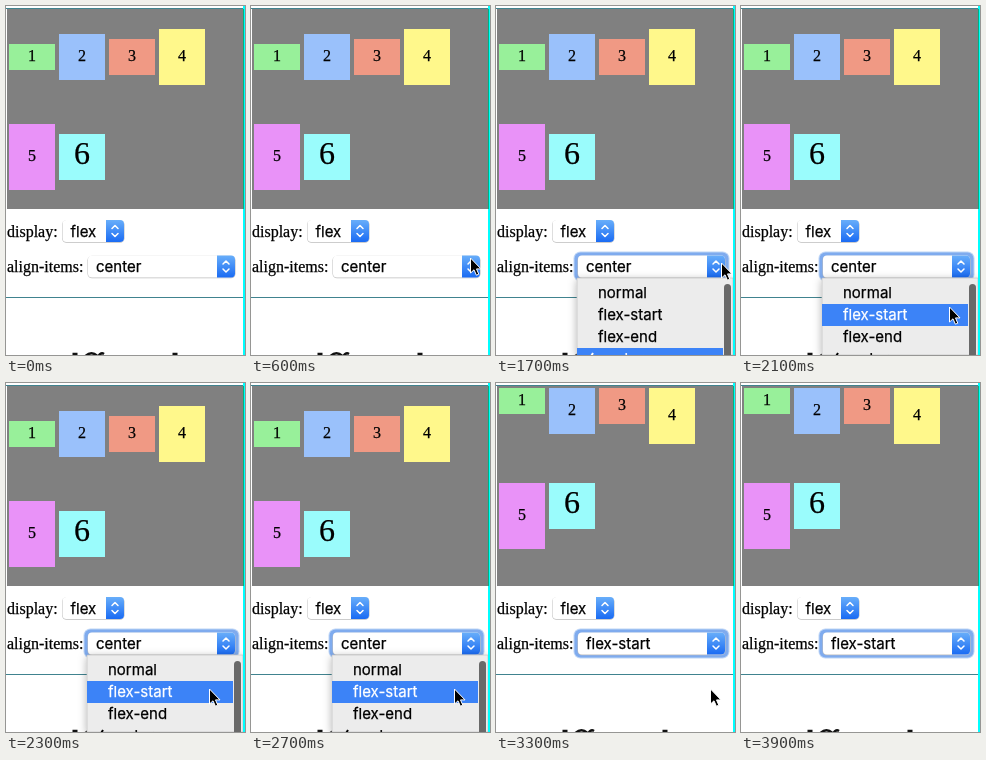
Recreate the animation shown at these times as an HTML page. Size 239 by 349 pixels, loop 4200 ms.

```html
<!DOCTYPE html>
<html lang="en">
<head>
<meta charset="utf-8">
<title>align-items</title>
<style>
  html, body { margin: 0; width: 100%; height: 100%; overflow: hidden; background: #fff; }
  svg { display: block; width: 239px; height: 349px; }
  text { font: 16px "Liberation Serif", serif; fill: #000; stroke: currentColor; stroke-width: .25px; }
  .ui text { font: 15px Inter, sans-serif; }
  .ui .active { fill: #fff; stroke: #fff; }
</style>
</head>
<body>
<svg id="stage" viewBox="0 0 239 349" xmlns="http://www.w3.org/2000/svg">
  <defs>
    <linearGradient id="blue" x2="0" y2="1">
      <stop stop-color="#68aefa"/><stop offset="1" stop-color="#1a6bf3"/>
    </linearGradient>
    <filter id="shadow" x="-20%" y="-20%" width="140%" height="140%">
      <feDropShadow dx="0" dy="2" stdDeviation="4" flood-opacity=".3"/>
    </filter>
  </defs>
  <rect width="239" height="349" fill="#fff"/>
  <path d="M0 2.5H239M0 291.5H239" stroke="#40838f"/>
  <rect x="1" y="3" width="236" height="200" fill="#808080"/>
  <g id="items"></g>
  <text x="1" y="231">display:</text>
  <text x="1" y="266">align-items:</text>
  <g fill="none" stroke="#111" stroke-width="2.5">
    <path d="M66.5 348h5M166.5 348h5"/>
    <path d="M79.5 350q6 -5.5 12 0M92.5 350q2.5 -4 5.5 -2"/>
  </g>
  <g class="ui">
    <g id="ring" fill="#7fabee">
      <rect x="77.5" y="245.5" width="156" height="30" rx="7" opacity=".5"/>
      <rect x="78.5" y="246.5" width="154" height="28" rx="6"/>
    </g>
    <g id="selects"></g>
    <g id="menu">
      <path d="M81 272H237V349H81Z" fill="#ececec" stroke="#bbb" stroke-width=".6" filter="url(#shadow)"/>
      <rect id="highlight" x="81" width="146" height="22" fill="#3c83f7"/>
      <g id="options"></g>
      <rect x="228" y="278" width="7" height="90" rx="3.5" fill="#696969"/>
    </g>
  </g>
  <rect x="237" width="2" height="349" fill="#00ffff"/>
  <rect x="237" y="3" width="1" height="200" fill="#00b080"/>
  <path id="cursor" d="M0 0V15L3.5 11.8L5.9 17.2L8.3 16.2L6 10.9H10.5Z" fill="#000" stroke="#fff" stroke-linejoin="round"/>
</svg>
<script>
const $ = id => document.getElementById(id);
const LOOP = 4200, STEP = 100;

function add(parent, tag, attrs, text = "") {
  const node = document.createElementNS("http://www.w3.org/2000/svg", tag);
  for (const key in attrs) node.setAttribute(key, attrs[key]);
  node.textContent = text;
  parent.append(node);
  return node;
}

const show = (node, on) => node.setAttribute("visibility", on ? "visible" : "hidden");

// Flex items: two lines, cross-axis positions follow the chosen alignment
const lines = [{ top: 5, middle: 51 }, { top: 100, middle: 151 }];
const items = [
  [26, "#98f09a"], [46, "#9ac1fb"], [36, "#f09984"],
  [56, "#fff88b"], [66, "#e992f8"], [46, "#9afcfc"]
].map(([height, fill], i) => {
  const group = add($("items"), "g");
  const x = 3 + (i % 4) * 50, big = i === 5;
  add(group, "rect", { x, width: 46, height, fill });
  const label = add(group, "text", { x: x + 23, y: height / 2 + (big ? 7 : 4), "text-anchor": "middle" }, i + 1);
  if (big) label.style.fontSize = "32px";
  return { group, height, line: lines[i < 4 ? 0 : 1] };
});

function addSelect(x, y, width, value) {
  const group = add($("selects"), "g", { transform: `translate(${x} ${y})` });
  add(group, "rect", { x: -.5, y: .3, width: width + 1, height: 22.5, rx: 4.5, fill: "#bdbdbd" });
  add(group, "rect", { width, height: 22, rx: 4, fill: "#fff" });
  add(group, "path", { d: `M${width - 18} 0h14q4 0 4 4v14q0 4 -4 4h-14Z`, fill: "url(#blue)" });
  add(group, "path", {
    d: `M${width - 12} 8.5l3 -3l3 3m0 5l-3 3l-3 -3`,
    fill: "none", stroke: "#fff", "stroke-width": 1.5, "stroke-linecap": "round", "stroke-linejoin": "round"
  });
  return add(group, "text", { x: 8, y: 16.5 }, value);
}
addSelect(56.5, 214, 61.5, "flex");
const alignValue = addSelect(82, 249.5, 147, "center");

const options = ["normal", "flex-start", "flex-end", "center"].map((name, i) =>
  add($("options"), "text", { x: 102, y: 292 + i * 22 }, name));
const tick = add($("options"), "path", { d: "M87 353l4 4l6 -10", fill: "none", "stroke-width": 2 });

// Pointer stops: time, x, y; a missing position hides it
const pointer = [
  [0], [500, 230, 252], [600, 219, 252], [700, 225, 257],
  [1900, 223, 266], [2000, 217, 284], [2100, 208, 301],
  [2200, 203, 306], [3300, 214, 306], [3400]
];

function activeOption(t, y) {
  if (t >= 2600 && t < 2700) return -1;
  return y < 276 ? 3 : y < 298 ? 0 : 1;
}

function draw(time) {
  const t = Math.floor((time % LOOP) / STEP) * STEP;
  const [, x, y] = pointer.findLast(stop => stop[0] <= t);
  show($("cursor"), x !== undefined);
  if (x !== undefined) $("cursor").setAttribute("transform", `translate(${x + .5} ${y})`);

  const chosen = t >= 2800;
  for (const { group, height, line } of items)
    group.setAttribute("transform", `translate(0 ${chosen ? line.top : line.middle - height / 2})`);
  alignValue.textContent = chosen ? "flex-start" : "center";
  show($("ring"), t >= 900);

  const open = t >= 1700 && t < 2800;
  $("menu").style.display = open ? "" : "none";
  if (!open) return;
  const active = activeOption(t, y);
  show($("highlight"), active >= 0);
  $("highlight").setAttribute("y", 276 + active * 22);
  options.forEach((option, i) => option.classList.toggle("active", i === active));
  tick.setAttribute("stroke", active === 3 ? "#fff" : "#000");
}

const start = performance.now();
function frame() {
  draw(performance.now() - start);
  requestAnimationFrame(frame);
}
frame();
</script>
</body>
</html>
```
